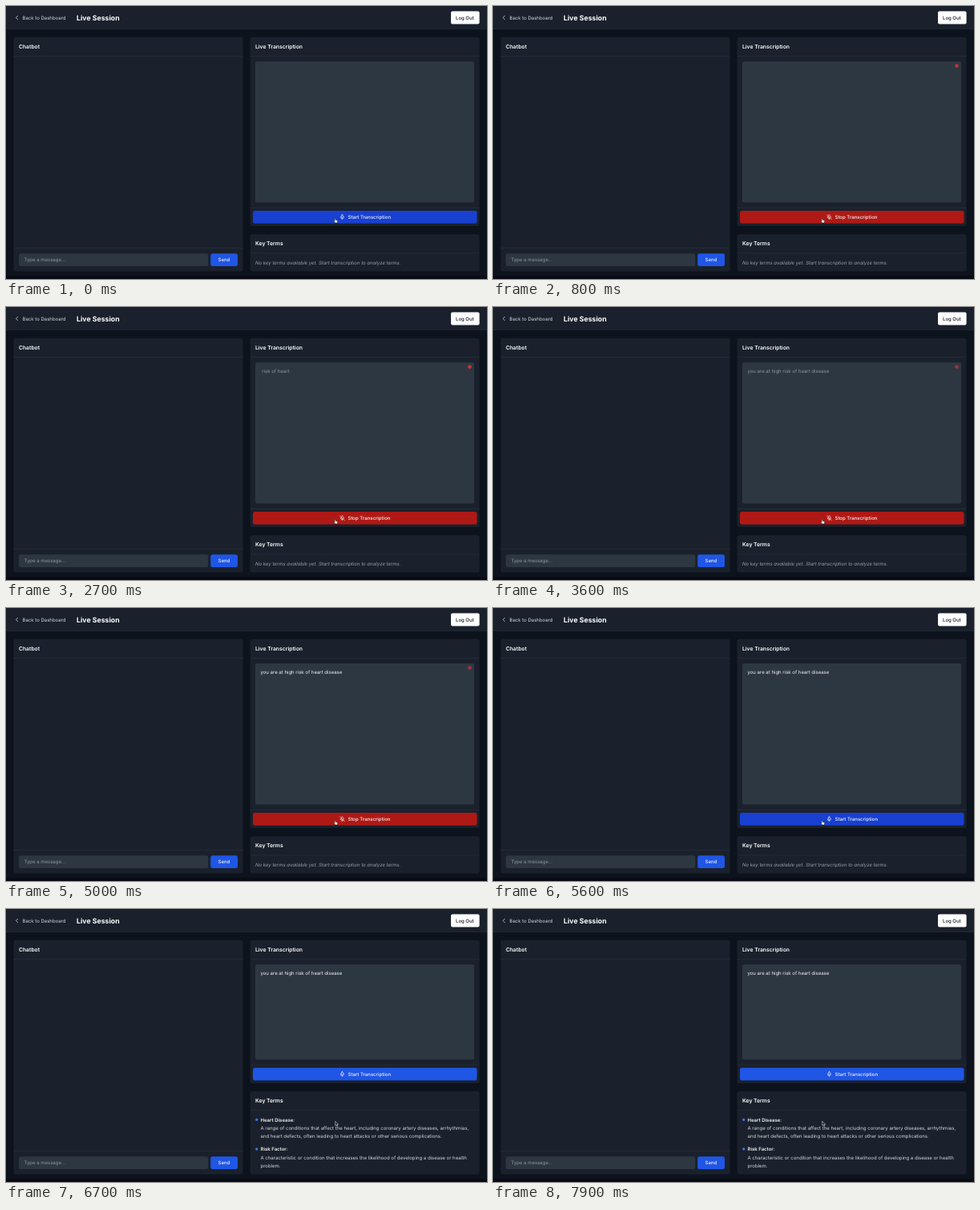
These frames come from a looping animation (600 px wide and 340 px high, 8000 ms). An HTML page:

```html
<!DOCTYPE html>
<html lang="en">
<head>
<meta charset="utf-8">
<title>Live Session</title>
<style>
  html, body { margin: 0; width: 100%; height: 100%; overflow: hidden; background: #0d131d; }
  svg { display: block; width: 600px; height: 340px; }
  text { font-family: Inter, "Liberation Sans", sans-serif; font-size: 6.02px; fill: #f3f4f6;
         text-rendering: geometricPrecision; white-space: pre; }
  .h1 { font-size: 8.75px; font-weight: 700; fill: #fff; }
  .h2 { font-size: 6.8px; font-weight: 600; fill: #fff; }
  .med { font-weight: 500; }
  .semi { font-weight: 600; }
  .body { fill: #d5d9df; }
  .muted { fill: #8d96a3; }
  .hint { fill: #98a1ad; font-style: italic; }
  .card { fill: #1a212c; }
  .field { fill: #2d3742; }
  .rule { fill: #28313d; }
  .icon { fill: none; stroke: #fff; stroke-width: 2; stroke-linecap: round; stroke-linejoin: round; }
</style>
</head>
<body>
<svg id="stage" viewBox="0 0 600 340"></svg>
<script>
const LOOP = 8000;
const START = 100, STOP = 5150, TERMS = 5950;
const FADE = 180;
const BLUE = [31, 86, 229], BLUE_HOVER = [24, 64, 209], RED = [175, 25, 21];

// time, text, is final
const SPEECH = [
  [0, ""],
  [1700, "you"],
  [1900, "you are at"],
  [2200, "you are at high"],
  [2500, " risk of"],
  [2700, " risk of heart"],
  [2900, " risk of heart disease"],
  [3200, "you are at high risk of heart disease"],
  [4600, "you are at high risk of heart disease", true]
];

const stage = document.getElementById("stage");

function add(tag, attrs, parent = stage, content = "") {
  const el = document.createElementNS("http://www.w3.org/2000/svg", tag);
  for (const key in attrs) el.setAttribute(key, attrs[key]);
  el.textContent = content;
  parent.appendChild(el);
  return el;
}
const box = (x, y, width, height, cls, rx = 0, parent) =>
  add("rect", { x, y, width, height, rx, class: cls }, parent);
const label = (x, y, content, cls = "", parent) =>
  add("text", { x, y, class: cls }, parent, content);
const path = (d, attrs, parent) => add("path", { d, ...attrs }, parent);
const group = (transform = "", parent) => add("g", { transform }, parent);

function card(x, y, w, h, title) {
  const rect = box(x, y, w, h, "card", 3);
  const head = group(`translate(${x} ${y})`);
  box(0, 23.4, w, 0.6, "rule", 0, head);
  label(6.4, 13.8, title, "h2", head);
  return { rect, head };
}

// Page and header
add("rect", { width: 600, height: 340, fill: "#0d131d" });
add("rect", { y: 336.5, width: 600, height: 3.5, fill: "#090a13" });
box(0, 0, 600, 28.4, "card");
box(0, 28.2, 600, 0.6, "rule");
path("M14.6 12.3 L12.4 14.5 L14.6 16.7", { class: "icon", style: "stroke:#d1d5db;stroke-width:.8" });
label(20.5, 16.7, "Back to Dashboard", "body");
label(88, 17.7, "Live Session", "h1");
add("rect", { x: 555, y: 6.4, width: 35.6, height: 16.1, rx: 2, fill: "#fff" });
label(561, 16.7, "Log Out", "med").style.fill = "#151b26";

// Chatbot
card(9.5, 38.8, 286, 291.7, "Chatbot");
box(9.5, 301.3, 286, 0.6, "rule");
box(16, 308.3, 236.2, 15.8, "field", 2.5);
label(22.4, 318.4, "Type a message...", "muted");
add("rect", { x: 255.2, y: 308.3, width: 33.8, height: 15.8, rx: 2.5, fill: `rgb(${BLUE})` });
label(264.5, 318.4, "Send", "med");

// Transcription
const live = card(304.6, 38.8, 286, 235.3, "Live Transcription");
const field = box(311, 69, 273, 175.8, "field", 2.5);
const speech = label(317.5, 82.3, "");
const dot = add("circle", { cx: 578.5, cy: 74.6, r: 2.3, fill: "#ef3434" });
const action = group();
box(304.6, 251, 286, 0.6, "rule", 0, action);
const button = box(308, 254.9, 279.5, 15.8, "", 2.5, action);
const caption = label(426.5, 265.1, "", "med", action);
const iconAt = "translate(415.9 259.3) scale(.29)";
const mic = group(iconAt, action);
path("M12 2a3 3 0 0 0-3 3v7a3 3 0 0 0 6 0V5a3 3 0 0 0-3-3zM19 10v2a7 7 0 0 1-14 0v-2M12 19v3", { class: "icon" }, mic);
const micOff = group(iconAt, action);
path("M2 2l20 20M18.9 13.2A7 7 0 0 0 19 12v-2M5 10v2a7 7 0 0 0 12 5M15 9.3V5a3 3 0 0 0-5.7-1.3M9 9v3a3 3 0 0 0 5.1 2.1M12 19v3", { class: "icon" }, micOff);

// Key terms
const key = card(304.6, 284.2, 286, 46.3, "Key Terms");
const hint = label(311, 321.8, "No key terms available yet. Start transcription to analyze terms.", "hint");
const terms = group();
function term(y, name, lines) {
  add("circle", { cx: 312.7, cy: y, r: 1.6, fill: "#3b7bea" }, terms);
  label(317.5, y + 2.1, name, "semi", terms);
  lines.forEach((line, i) => label(317.5, y + 13 + i * 9.8, line, "body", terms));
}
term(262.4, "Heart Disease:", [
  "A range of conditions that affect the heart, including coronary artery diseases, arrhythmias,",
  "and heart defects, often leading to heart attacks or other serious complications."
]);
term(298.9, "Risk Factor:", [
  "A characteristic or condition that increases the likelihood of developing a disease or health",
  "problem."
]);

// Cursors
const hand = group("translate(408.6 264.2)");
path("M1.3 .9Q1.8 .1 2.3 .9L2.6 2.4Q4.9 2.4 5.1 3.5L4.7 5.9H2.2L.4 3.9Q.3 3 1.5 3.5Z",
  { fill: "#fff", stroke: "#10131c", "stroke-width": 0.5, "stroke-linejoin": "round" }, hand);
const arrow = group("translate(410.8 264.4)");
path("M0 0V5.2L1.2 4.1L2 6L2.9 5.6L2.1 3.8H3.7Z",
  { fill: "#080a0e", stroke: "#e8eaed", "stroke-width": 0.6, "stroke-linejoin": "round" }, arrow);

const show = (el, on) => el.setAttribute("display", on ? "inline" : "none");
const mix = (a, b, k) => a.map((v, i) => Math.round(v + (b[i] - v) * k));
const ease = k => { k = Math.min(1, Math.max(0, k)); return k * k * (3 - 2 * k); };

function buttonColor(t) {
  const since = from => ease((t - from) / FADE);
  if (t < STOP) return mix(BLUE_HOVER, RED, since(START));
  if (t < TERMS) return mix(RED, BLUE_HOVER, since(STOP));
  return mix(BLUE_HOVER, BLUE, since(TERMS));
}

function render(t) {
  const recording = t >= START && t < STOP;
  const done = t >= TERMS;
  const rise = done ? -57.2 : 0;

  button.style.fill = `rgb(${buttonColor(t)})`;
  caption.textContent = recording ? "Stop Transcription" : "Start Transcription";
  show(mic, !recording);
  show(micOff, recording);
  show(dot, recording);
  dot.setAttribute("opacity", 0.75 + 0.25 * Math.cos((t - 300) / 1000 * Math.PI));

  const [, words, final] = SPEECH.filter(s => s[0] <= t).pop();
  speech.textContent = words;
  speech.setAttribute("class", final ? "" : "muted");

  live.rect.setAttribute("height", 235.3 + rise);
  field.setAttribute("height", 175.8 + rise);
  action.setAttribute("transform", `translate(0 ${rise})`);
  key.rect.setAttribute("y", 284.2 + rise);
  key.rect.setAttribute("height", 46.3 - rise);
  key.head.setAttribute("transform", `translate(304.6 ${284.2 + rise})`);
  show(hint, !done);
  show(terms, done);
  show(hand, !done);
  show(arrow, done);
}

const origin = performance.now();
function tick() {
  render((performance.now() - origin) % LOOP);
  requestAnimationFrame(tick);
}
tick();
</script>
</body>
</html>
```
